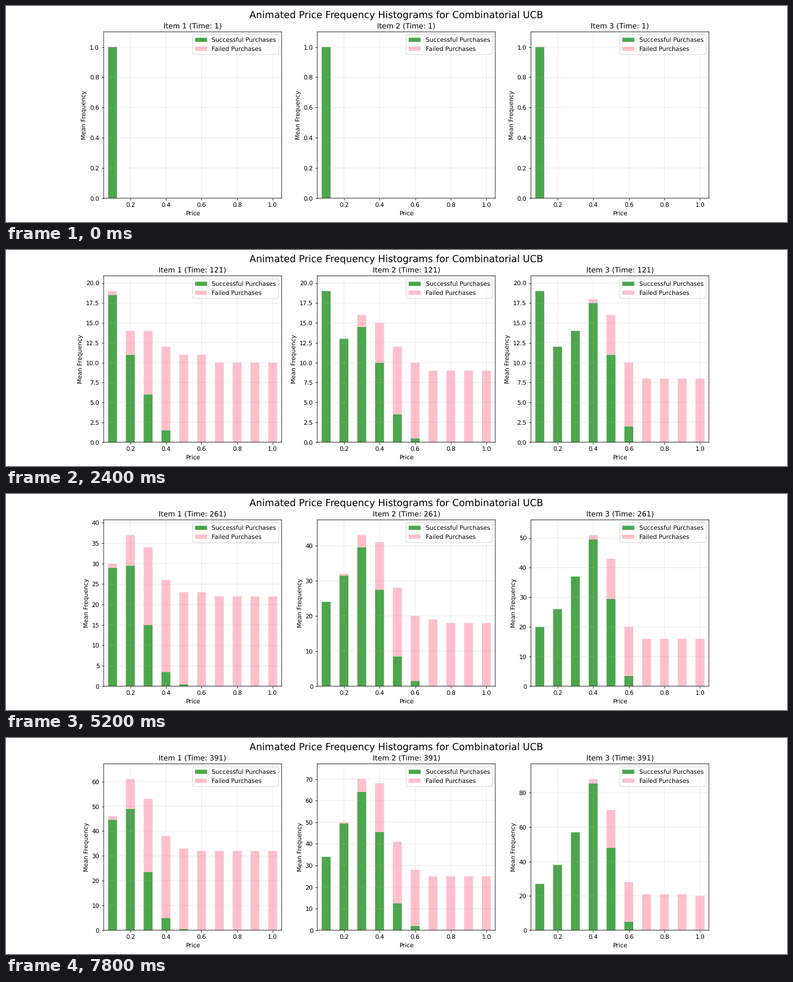
A matplotlib script that plays this animation: 1280 px wide and 356 px high, repeating every 8 s.

```python
import math

import numpy as np
import matplotlib.pyplot as plt
from matplotlib.animation import FuncAnimation

W, H = 1280, 356
DPI = W / 18
FRAMES, INTERVAL = 40, 200
STEP = 10            # rounds played per frame
WARMUP = 19          # opening rounds spent on the lowest price
BONUS = 11           # exploration strength
PRICES = np.arange(1, 11) / 10
# Mean and spread of what buyers will pay for each item
BUYERS = [(0.285, 0.1), (0.445, 0.105), (0.535, 0.072)]


def sale_chance(mean, spread):
    """Chance that a normally distributed valuation exceeds each price."""
    return np.array([0.5 * math.erfc((p - mean) / (spread * math.sqrt(2)))
                     for p in PRICES])


def play(chance):
    """Pulls per price after every round of an upper-confidence bandit."""
    pulls = np.zeros(len(PRICES))
    history = []
    for turn in range(1 + STEP * (FRAMES - 1)):
        with np.errstate(divide="ignore"):
            score = PRICES * chance + np.sqrt(BONUS / pulls)
        pulls[0 if turn < WARMUP else np.argmax(score)] += 1
        history.append(pulls.copy())
    return history


plt.rcParams.update({
    "font.family": "DejaVu Sans",
    "text.hinting": "none",
    "path.snap": False,
})
# The tiny margin keeps the pixel size from being truncated
fig, axes = plt.subplots(1, 3, dpi=DPI,
                         figsize=(W / DPI + 1e-6, H / DPI + 1e-6))
fig.suptitle("Animated Price Frequency Histograms for Combinatorial UCB",
             fontsize=16)

panels = []
for ax, (mean, spread) in zip(axes, BUYERS):
    zero = np.zeros(len(PRICES))
    good = ax.bar(PRICES, zero, width=0.05, color="green", alpha=0.7,
                  label="Successful Purchases")
    bad = ax.bar(PRICES, zero, width=0.05, color="pink",
                 label="Failed Purchases")
    ax.set_xlim(0.05, 1.05)
    ax.set_xlabel("Price")
    ax.set_ylabel("Mean Frequency")
    ax.grid(True, alpha=0.3)
    ax.legend(loc="upper right")
    chance = sale_chance(mean, spread)
    panels.append((ax, good, bad, chance, play(chance)))


def update(frame):
    t = 1 + STEP * frame
    for i, (ax, good, bad, chance, history) in enumerate(panels, 1):
        total = history[t - 1]
        wins = np.round(2 * total * chance) / 2
        for g, b, win, n in zip(good, bad, wins, total):
            g.set_height(win)
            b.set_y(win)
            b.set_height(n - win)
        ax.set_ylim(0, 1.1 * total.max())
        ax.set_title(f"Item {i} (Time: {t})")
    return []


anim = FuncAnimation(fig, update, frames=FRAMES, interval=INTERVAL,
                     init_func=lambda: update(0), repeat=True, repeat_delay=0)
plt.show()
```
